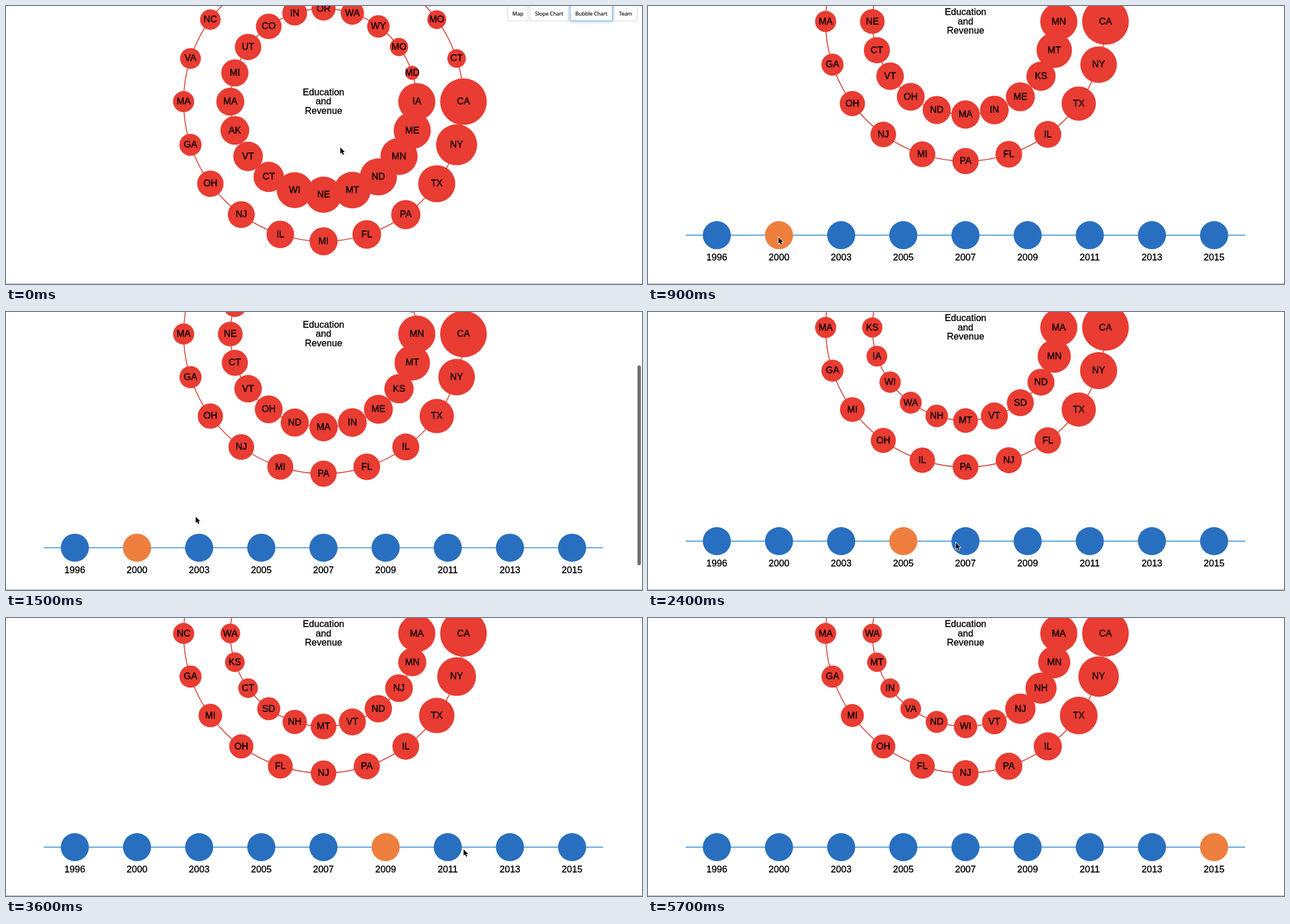
An HTML page with a canvas for the animation above (6 s loop, 1130 by 495 pixels).

```html
<!DOCTYPE html>
<html lang="en">
<head>
<meta charset="utf-8">
<title>Education and Revenue</title>
<style>
  html, body { margin: 0; width: 100%; height: 100%; overflow: hidden; background: #fff; }
  canvas { display: block; }
</style>
</head>
<body>
<canvas id="stage" width="1130" height="495"></canvas>
<script>
const ctx = document.getElementById('stage').getContext('2d');
const RED = '#e93c32', BLUE = '#296fc0', ORANGE = '#ee7f3e';
const STEP = 300, LOOP = 6000;
const CENTER_X = 564.2, TOP = 170.3, MAX_SCROLL = 142.8;
const SANS = '16.6px "Liberation Sans", Arial, sans-serif';
const YEARS = [1996, 2000, 2003, 2005, 2007, 2009, 2011, 2013, 2015];
const CLICK_STEPS = [0, 3, 7, 8, 9, 11, 13, 15, 16];
const SCROLL_BACK = 4, POINTER_GONE = 18;

// Pointer path: [step, x, y].
const POINTER = [
  [1, 594, 252], [2, 76, 415], [3, 232, 412], [4, 337, 318], [6, 337, 411],
  [8, 547, 411], [12, 813, 412], [14, 882, 411], [15, 985, 411], [17, 1010, 415]
];

// Linear interpolation through [at, value] points, held at both ends.
function along(points, at) {
  const next = points.findIndex(p => p[0] >= at);
  if (next === 0) return points[0][1];
  if (next < 0) return points[points.length - 1][1];
  const [a, from] = points[next - 1], [b, to] = points[next];
  return from + (to - from) * (at - a) / (b - a);
}

// Labels run by rank; radii fall along a curve through a few ranks.
const ring = (labels, curve) => {
  const points = Object.entries(curve).map(([rank, radius]) => [+rank, radius]);
  return labels.split(' ').map((label, i) => ({ label, radius: along(points, i) }));
};
const inner = (labels, curve) => ring(labels, { 0: 33, ...curve });
const outer = (labels, second, third, fourth, ninth) => ring(labels,
  { 0: 41.5, 1: second, 2: third, 3: fourth, 8: ninth, 9: 19.7, 10: 18.8, 19: 16.5 });

const data = {
  1996: [
    inner('IA ME MN ND MT NE WI CT VT AK MA MI UT CO IN OR WA WY MO MD', { 3: 33, 6: 32, 7: 27, 17: 20, 19: 12.5 }),
    outer('CA NY TX PA FL MI IL NJ OH GA MA VA NC - - - - - MO CT', 36.5, 33, 26, 23.5)],
  2000: [
    inner('MN MT KS ME IN MA ND OH VT CT NE OR NC ID MI IL VA WY MD NY', { 1: 31.5, 2: 26, 8: 24.5, 12: 19.5, 13: 16, 19: 13 }),
    outer('CA NY TX IL FL PA MI NJ OH GA MA NC VA - - - - - MO CT', 32.5, 30.5, 24, 22.5)],
  2005: [
    inner('MA MN ND SD VT MT NH WA WI IA KS', { 1: 29.5, 2: 24, 4: 24, 6: 20, 10: 18 }),
    outer('CA NY TX FL NJ PA IL OH MI GA MA', 33, 30.5, 23.5, 22)],
  2009: [
    inner('MA MN NJ ND VT MT NH SD CT KS WA', { 1: 25, 4: 24, 7: 20.5, 8: 17.5 }),
    outer('CA NY TX IL PA NJ FL OH MI GA NC', 34.5, 31.5, 23.8, 21)],
  2013: [
    inner('MA NH NJ MN VT ND CO KS OH PA WA', { 1: 26, 4: 24.5, 5: 18.5, 6: 17 }),
    outer('CA NY TX IL PA NJ FL OH MI GA MA', 37.5, 33.5, 25.5, 20.5)],
  2015: [
    inner('MA MN NH NJ VT WI ND VA IN MT WA', { 1: 28.5, 3: 27, 4: 22, 8: 17.3 }),
    outer('CA NY TX IL PA NJ FL OH MI GA MA', 36, 33.5, 25, 20.5)]
};

// Years between two known ones take the mean radius.
const blend = (before, after) => before.map((items, k) =>
  after[k].map(({ label, radius }, i) => ({ label, radius: (radius + items[i].radius) / 2 })));
data[2003] = blend(data[2000], data[2005]);
data[2007] = blend(data[2005], data[2009]);
data[2011] = blend(data[2009], data[2013]);

function disc(x, y, r, color) {
  ctx.fillStyle = color;
  ctx.beginPath();
  ctx.arc(x, y, r, 0, Math.PI * 2);
  ctx.fill();
}

// A hairline outline gives the text its slightly heavier weight.
function label(text, x, y, font = SANS, outline = .35) {
  ctx.font = font;
  ctx.textAlign = 'center';
  ctx.fillStyle = ctx.strokeStyle = '#000';
  ctx.lineWidth = outline;
  ctx.fillText(text, x, y);
  ctx.strokeText(text, x, y);
}

function drawRing(items, size, cy) {
  ctx.strokeStyle = '#d5463b';
  ctx.lineWidth = 1.7;
  ctx.beginPath();
  ctx.arc(CENTER_X, cy, size, 0, Math.PI * 2);
  ctx.stroke();
  const placed = items.map((item, i) => ({
    ...item,
    x: CENTER_X + size * Math.cos(i * Math.PI / 10),
    y: cy + size * Math.sin(i * Math.PI / 10)
  })).filter(item => item.label !== '-');
  placed.forEach(p => disc(p.x, p.y, p.radius, RED));
  placed.forEach(p => label(p.label, p.x, p.y + 5));
}

function drawTimeline(cy, selected) {
  const y = cy + 380.5;
  ctx.fillStyle = '#55a3dc';
  ctx.fillRect(67, y - 1, 994, 2);
  YEARS.forEach((year, i) => {
    const x = 122.3 + i * 110.44;
    disc(x, y, 25, year === selected ? ORANGE : BLUE);
    label(year, x, y + 45.3);
  });
}

function drawNav(top, focused) {
  const buttons = [['Map', 891, 36], ['Slope Chart', 930, 69], ['Bubble Chart', 1002, 75], ['Team', 1080, 41]];
  for (const [text, x, width] of buttons) {
    const active = focused && text === 'Bubble Chart';
    ctx.save();
    ctx.lineWidth = 1;
    ctx.strokeStyle = active ? '#79ade0' : '#d5d0d3';
    ctx.fillStyle = '#fff';
    if (active) {
      ctx.shadowColor = '#8cc4f5';
      ctx.shadowBlur = 6;
    }
    ctx.fillRect(x + .5, top - 10, width, 36.5);
    ctx.strokeRect(x + .5, top - 10, width, 36.5);
    ctx.restore();
    label(text, x + width / 2 + .5, top + 16.6, '9.3px "Open Sans", sans-serif', .2);
  }
}

function drawPointer(x, y) {
  ctx.save();
  ctx.translate(x, y);
  ctx.beginPath();
  [[0, 0], [0, 11], [2.6, 8.8], [4.5, 13], [6.4, 12.2], [4.6, 8.1], [8, 8]]
    .forEach(p => ctx.lineTo(...p));
  ctx.closePath();
  ctx.strokeStyle = '#fff';
  ctx.lineWidth = 1.6;
  ctx.stroke();
  ctx.fillStyle = '#000';
  ctx.fill();
  ctx.restore();
}

function drawScrollbar(scroll) {
  ctx.fillStyle = '#6f6f6f';
  ctx.beginPath();
  ctx.roundRect(1122, scroll * .724, 6, 356, 3);
  ctx.fill();
}

function draw(step) {
  // The page glides down twice: at the start and again after jumping back up.
  const glide = step < SCROLL_BACK ? step : step - SCROLL_BACK;
  const scroll = MAX_SCROLL * (1 - Math.exp(-2.5 * glide));
  const cy = TOP - scroll;
  const year = YEARS[CLICK_STEPS.findLastIndex(click => click <= step)];

  ctx.fillStyle = '#fff';
  ctx.fillRect(0, 0, 1130, 495);
  drawRing(data[year][1], 248.6, cy);
  drawRing(data[year][0], 165.7, cy);
  ['Education', 'and', 'Revenue'].forEach((line, i) =>
    label(line, CENTER_X, cy - 11.6 + i * 16.6));
  drawTimeline(cy, year);
  drawNav(-scroll, step === 0);
  if (step > 0 && glide < 3) drawScrollbar(scroll);
  ctx.fillStyle = '#a8a8a8';
  ctx.fillRect(0, 494, 1130, 1);
  if (step < POINTER_GONE) {
    drawPointer(along(POINTER, step), along(POINTER.map(([at, , y]) => [at, y]), step));
  }
}

function tick() {
  draw(Math.floor(performance.now() % LOOP / STEP));
  requestAnimationFrame(tick);
}
tick();
</script>
</body>
</html>
```
